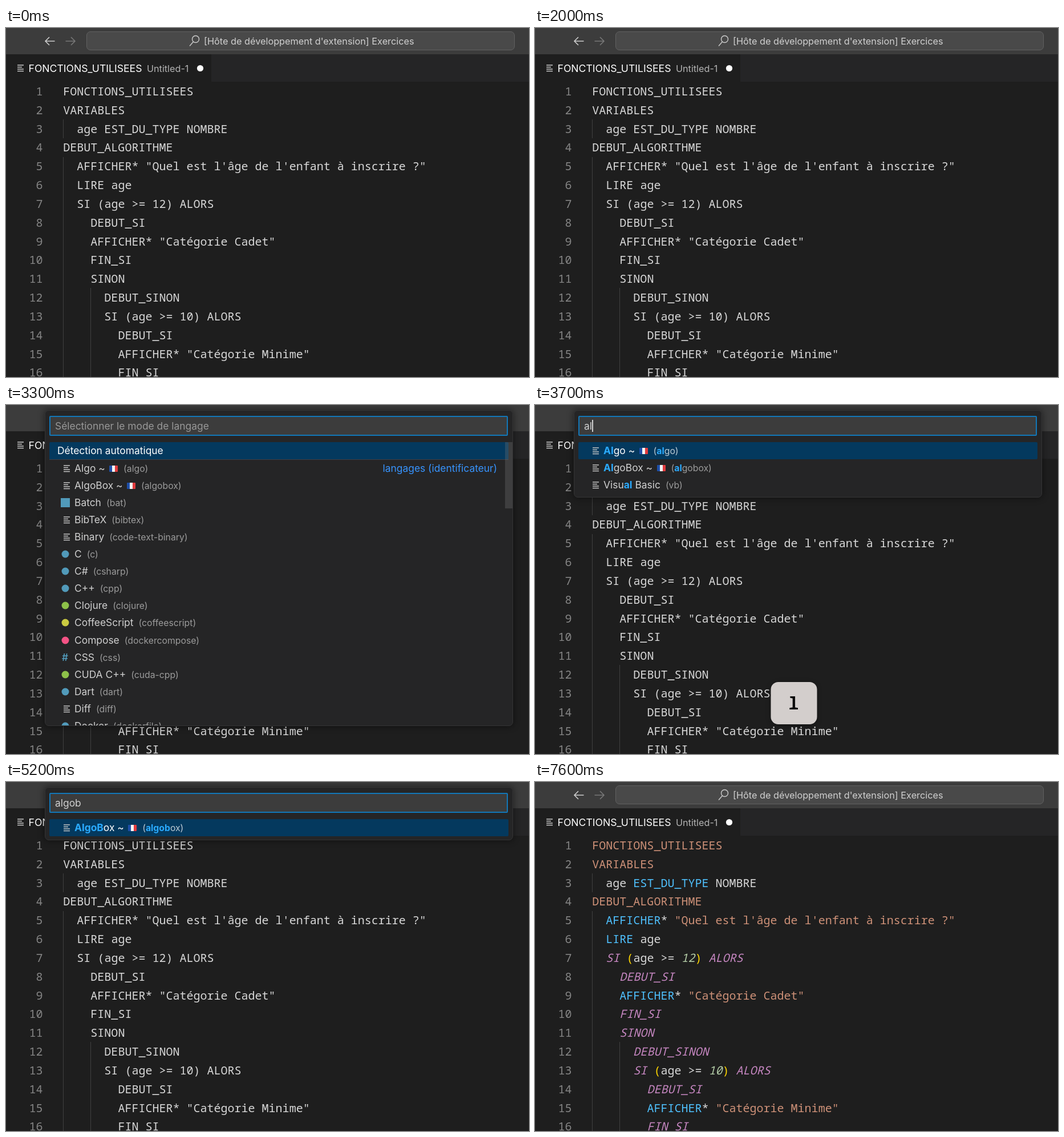
An HTML page that plays this animation: 917 by 611 pixels, repeating every 8470 ms.

```html
<!DOCTYPE html>
<html lang="fr">
<head>
<meta charset="utf-8">
<title>Mode de langage</title>
<style>
  html, body { margin: 0; width: 100%; height: 100%; overflow: hidden; background: #1e1e1e; }
  #stage { position: relative; width: 917px; height: 611px; overflow: hidden; background: #1e1e1e; font: 17.4px Inter, sans-serif; color: #d0d0d0; }
  #stage > *, #picker > * { position: absolute; }
  #stage * { box-sizing: border-box; white-space: pre; }
  [hidden] { display: none !important; }

  #title { left: 0; top: 0; width: 917px; height: 46px; background: #3c3c3c; }
  #search { left: 141px; top: 6px; width: 751px; height: 33px; padding-left: 205px; border: 1px solid #616161; border-radius: 7px; background: #494949; font-size: 16.28px; line-height: 32px; }
  #tabs { left: 0; top: 46px; width: 917px; height: 48px; background: #252526; }
  #tab { left: 0; top: 46px; width: 360px; height: 48px; background: #1e1e1e; }
  #file { left: 39.5px; top: 47px; line-height: 48px; font-size: 17.6px; color: #fff; }
  #sub { left: 247px; top: 47px; line-height: 49px; font-size: 16.2px; color: #b4b4b4; }
  #chrome { left: 0; top: 0; fill: none; stroke: #ccc; stroke-width: 1.4; }

  #code { left: 0; top: 95px; font: 500 20.03px/32.83px "Noto Sans Mono", monospace; color: #d8d8d8; }
  .line { position: relative; height: 32.83px; padding-left: 100.3px; }
  .line i { position: absolute; left: 0; width: 64.5px; text-align: right; font-style: normal; font-weight: 400; color: #858585; }
  .guide { width: 1px; background: #404040; }
  .lit .str { color: #ce9178; }
  .lit .fn { color: #4fc1ff; }
  .lit .kw { color: #c586c0; font-style: italic; }
  .lit .num { color: #b5cea8; font-style: italic; }
  .lit .par { color: #ffd700; }

  #picker { left: 68px; top: 9px; width: 821px; background: #252526; border: 1px solid #343435; border-radius: 7px; box-shadow: 0 0 12px 1px rgba(0, 0, 0, .45); overflow: hidden; }
  #input { left: 7px; top: 9px; width: 804px; height: 35px; padding-left: 8px; line-height: 32px; border: 2px solid #1277b8; border-radius: 2px; background: #3c3c3c; }
  #hint { color: #989898; }
  #caret { position: absolute; top: 5px; width: 1.7px; height: 21px; background: #d0d0d0; }
  #list { left: 7px; top: 55px; width: 805px; }
  .row { position: relative; height: 30.1px; line-height: 30.1px; padding-left: 44px; }
  .row.auto { height: 30.6px; padding-left: 14px; }
  .row.on { background: #04395e; color: #fff; border-radius: 2px; }
  .row.rule { box-shadow: 0 -1px #3f3f46; }
  .row svg { position: absolute; left: 19px; top: 5px; }
  .row small { margin-left: 9px; font-size: 15.75px; color: #9b9b9b; }
  .row.on small { color: #bccad4; }
  .row b { color: #2aaaff; }
  .row em { position: absolute; right: 20px; font-style: normal; color: #3794ff; }
  .flag { display: inline-block; width: 15px; height: 11px; margin: 0 1px 0 2.5px; border-radius: 1px; background: linear-gradient(90deg, #1f4fa8 33%, #f4f4f4 33% 66%, #e23b3e 66%); }
  #bar { left: 806px; top: 55px; width: 13px; height: 116px; background: rgba(121, 121, 121, .3); }

  #key { left: 453.5px; top: 485px; height: 74px; padding: 0 31.5px; transform: translateX(-50%); border-radius: 13px; background: #d3cecc; color: #0c0c0c; box-shadow: 0 2px 8px rgba(0, 0, 0, .4); font: bold 30px/74px "Noto Sans Mono", "DejaVu Sans", monospace; }
  #key svg { display: block; width: 36px; height: 74px; }
</style>
</head>
<body>
<div id="stage">
  <div id="title"></div>
  <div id="search">[Hôte de développement d'extension] Exercices</div>
  <div id="tabs"></div>
  <div id="tab"></div>
  <div id="file">FONCTIONS_UTILISEES</div>
  <div id="sub">Untitled-1</div>
  <svg id="chrome" width="917" height="94">
    <g id="tools">
      <path d="M85.500 23H69.500M76 16L69 23L76 30" stroke-width="1.6"/>
      <path d="M104.500 23H120.500M114 16L121 23L114 30" stroke="#777" stroke-width="1.6"/>
      <circle cx="332.500" cy="19.500" r="6"/>
      <path d="M328.500 24L322 31.500"/>
    </g>
    <path d="M20 65H31M20 68.500H28M20 72H31M20 75.500H31"/>
    <circle cx="340.500" cy="70.500" r="5.600" fill="#fff" stroke="none"/>
  </svg>
  <div class="guide" style="left:100px;top:160px;height:33px"></div>
  <div class="guide" style="left:100px;top:226px;height:385px"></div>
  <div class="guide" style="left:148px;top:455px;height:156px"></div>
  <div id="code"></div>
  <div id="picker" hidden>
    <div id="input"><span id="typed"></span><span id="caret"></span><span id="hint">Sélectionner le mode de langage</span></div>
    <div id="list"></div>
    <div id="bar"></div>
  </div>
  <div id="key" hidden></div>
</div>
<script>
const LOOP = 8470;
const $ = id => document.getElementById(id);

const source = `FONCTIONS_UTILISEES
VARIABLES
  age EST_DU_TYPE NOMBRE
DEBUT_ALGORITHME
  AFFICHER* "Quel est l'âge de l'enfant à inscrire ?"
  LIRE age
  SI (age >= 12) ALORS
    DEBUT_SI
    AFFICHER* "Catégorie Cadet"
    FIN_SI
    SINON
      DEBUT_SINON
      SI (age >= 10) ALORS
        DEBUT_SI
        AFFICHER* "Catégorie Minime"
        FIN_SI`;

const token = /(?<str>"[^"]*"|FONCTIONS_UTILISEES|VARIABLES|DEBUT_ALGORITHME)|(?<fn>EST_DU_TYPE|AFFICHER|LIRE)|(?<kw>\b(?:DEBUT_SI(?:NON)?|FIN_SI|SINON|SI|ALORS)\b)|(?<num>\d+)|(?<par>[()])/g;
const paint = line => line.replace(token, (text, ...args) => {
  const groups = args[args.length - 1];
  const kind = Object.keys(groups).find(k => groups[k]);
  return `<span class="${kind}">${text}</span>`;
});
$('code').innerHTML = source.split('\n')
  .map((line, i) => `<div class="line"><i>${i + 1}</i>${paint(line)}</div>`).join('');

// label | identifier | icon: none = lines, # = hash, otherwise shape and colour
const languages = `Algo ~ |algo
AlgoBox ~ |algobox
Batch|bat|square #519aba
BibTeX|bibtex
Binary|code-text-binary
C|c|dot #519aba
C#|csharp|dot #519aba
C++|cpp|dot #519aba
Clojure|clojure|dot #8dc149
CoffeeScript|coffeescript|dot #cbcb41
Compose|dockercompose|dot #f55385
CSS|css|#
CUDA C++|cuda-cpp|dot #8dc149
Dart|dart|dot #519aba
Diff|diff
Docker|dockerfile|dot #519aba
Handlebars|handlebars|dot #e37933
Java|java|dot #cc3e44
JavaScript|javascript|dot #cbcb41
JavaScript JSX|javascriptreact|dot #519aba
LaTeX|latex
Makefile|makefile|dot #e37933
Markdown|markdown|dot #519aba
Razor|razor|dot #519aba
SASS|sass|dot #f55385
Visual Basic|vb`.split('\n').map(s => s.split('|'));

const at = (text, query) => text.toLowerCase().indexOf(query);

function icon(spec = '') {
  const [shape, color] = spec.split(' ');
  const art = {
    '': '<path d="M6 5H17M6 8.500H14M6 12H17M6 15.500H17" stroke="#c5c5c5" stroke-width="1.400"/>',
    '#': '<text x="3" y="16" font-size="17" font-weight="600" fill="#519aba">#</text>',
    dot: `<circle cx="9" cy="10" r="6.500" fill="${color}"/>`,
    square: `<rect x="1" y="2" width="16" height="16" fill="${color}"/>`
  }[shape];
  return `<svg width="20" height="20">${art}</svg>`;
}

function mark(text, query) {
  const i = at(text, query), end = i + query.length;
  return i < 0 || !query ? text : `${text.slice(0, i)}<b>${text.slice(i, end)}</b>${text.slice(end)}`;
}

function row([label, id, art], query, cls, note = '') {
  const flag = label.includes('~') ? '<span class="flag"></span>' : '';
  return `<div class="row ${cls}">${note}${icon(art)}${mark(label, query)}${flag}<small>(${mark(id, query)})</small></div>`;
}

function fillPicker(query) {
  const rank = ([label]) => at(label, query) < 0 ? Infinity : at(label, query);
  const hits = languages.filter(([label, id]) => at(label, query) >= 0 || at(id, query) >= 0);
  if (query) hits.sort((a, b) => rank(a) < rank(b) ? -1 : rank(a) > rank(b) ? 1 : 0);
  const firstClass = query ? 'on' : 'rule';
  const note = query ? '' : '<em>langages (identificateur)</em>';
  const rows = hits.map((l, i) => i ? row(l, query, '') : row(l, query, firstClass, note));
  if (!query) rows.unshift('<div class="row auto on">Détection automatique</div>');
  $('list').innerHTML = rows.join('');
  $('typed').textContent = query;
  $('hint').hidden = !!query;
  $('bar').hidden = rows.length < 16;
  $('picker').style.height = Math.min(552.5, 62.7 + 30.1 * rows.length) + 'px';
}

const enter = `<svg viewBox="0 0 36 74">
  <defs><linearGradient id="blue" x2="0" y2="1"><stop stop-color="#9fb4c4"/><stop offset="1" stop-color="#507ba3"/></linearGradient></defs>
  <rect x="2.500" y="21.500" width="31" height="31" rx="6" fill="url(#blue)" stroke="#5c7486"/>
  <path d="M14 31.500H21.500a5 5 0 0 1 0 10H15" fill="none" stroke="#fff" stroke-width="3.400"/>
  <path d="M8 41.500L16.500 35.500V47.500Z" fill="#fff"/></svg>`;

const keys = [
  [1500, 2000, '⌘k'], [2300, 2800, 'm'], [3400, 3600, 'a'], [3600, 3800, 'l'],
  [3800, 4000, 'g'], [4000, 4500, 'o'], [4700, 5200, 'b'], [6300, 6800, enter]
];
const typing = [[3400, 'a'], [3600, 'al'], [3800, 'alg'], [4000, 'algo'], [4700, 'algob']];
const carets = [[2600, 3300], [3400, 4500], [4700, 5200], [5700, 6200]];
const within = (t, [from, to]) => t >= from && t < to;

const last = {};
function update(name, value, apply) {
  if (last[name] === value) return;
  last[name] = value;
  apply(value);
}

function draw() {
  const t = performance.now() % LOOP;
  const key = keys.find(k => within(t, k));
  const query = typing.reduce((text, [from, next]) => t >= from ? next : text, '');
  update('lit', t >= 6400, on => $('code').classList.toggle('lit', on));
  update('picker', within(t, [2600, 6300]), on => {
    $('picker').hidden = !on;
    $('search').hidden = on;
    $('tools').style.display = on ? 'none' : '';
  });
  update('query', query, fillPicker);
  update('caret', carets.some(c => within(t, c)), on => $('caret').hidden = !on);
  update('key', key ? key[2] : '', html => {
    $('key').hidden = !html;
    $('key').innerHTML = html;
  });
  requestAnimationFrame(draw);
}
draw();
</script>
</body>
</html>
```
